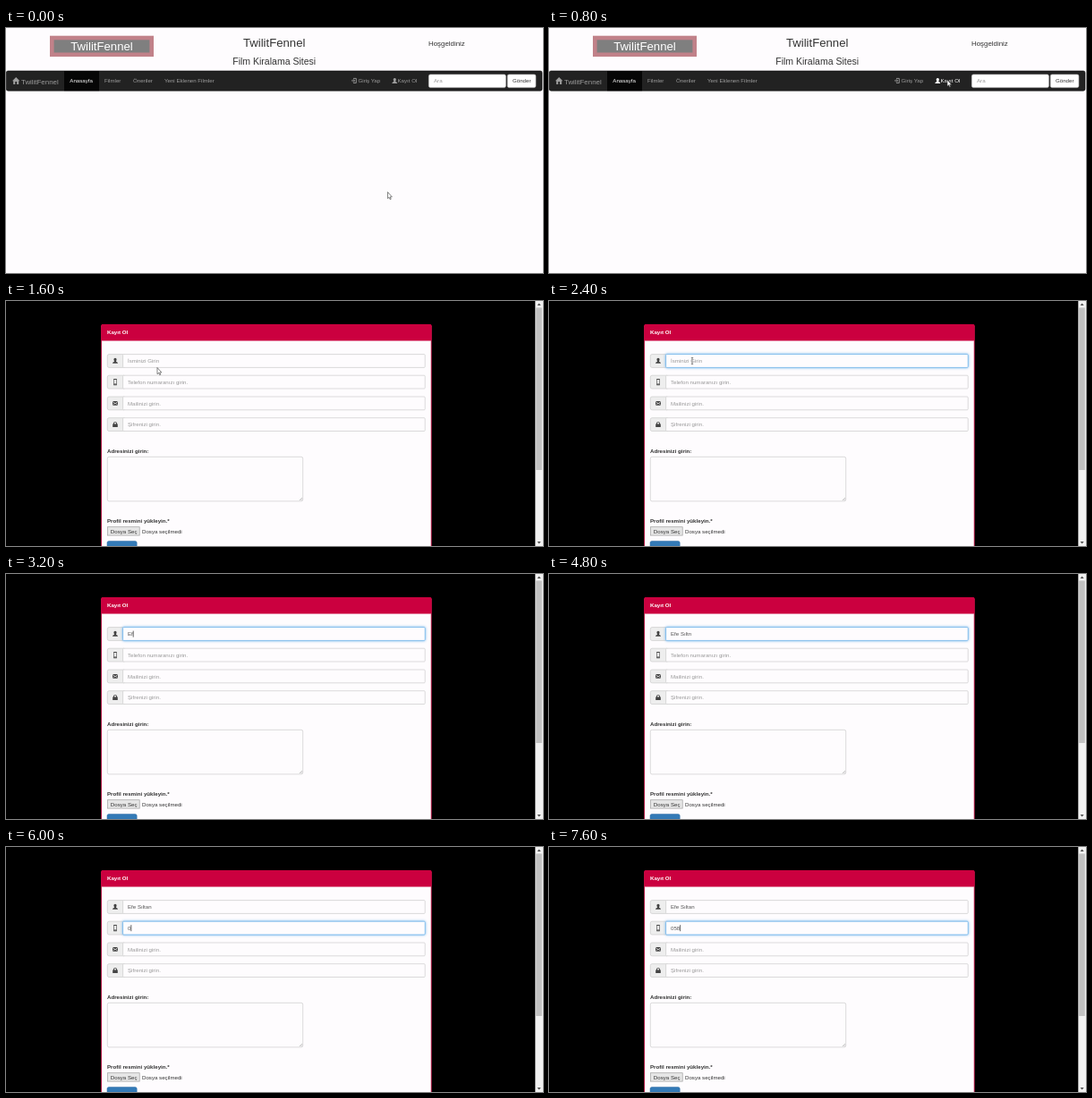
An HTML page for the animation above (8 s loop, 600 px wide and 274 px high).

```html
<!DOCTYPE html>
<html lang="tr">
<head>
<meta charset="utf-8">
<style>
html, body { margin: 0; width: 100%; height: 100%; overflow: hidden; background: #fefcfe; }
svg { display: block; }
text { font: 6.15px "Liberation Sans", Arial, sans-serif; fill: #333; white-space: pre; }
.nav { fill: #9d9d9d; }
.b { font-weight: bold; }
.h2 { font-size: 13.17px; }
.h3 { font-size: 10.53px; }
.h4 { font-size: 7.9px; }
.mid { text-anchor: middle; }
.white { fill: #fff; }
.hint { fill: #999; }
.typed { fill: #555; }
.box { fill: #fefcfe; stroke: #ccc; stroke-width: .7; }
.focus { stroke: #66afe9; filter: drop-shadow(0 0 1.6px #66afe9); }
</style>
</head>
<body>
<svg id="stage" width="600" height="274" viewBox="0 0 600 274"></svg>
<script>
const stage = document.getElementById('stage');
const text = (x, y, s, cls = '') => `<text x="${x}" y="${y}" class="${cls}">${s}</text>`;
const rect = (x, y, w, h, attrs) => `<rect x="${x}" y="${y}" width="${w}" height="${h}" ${attrs}/>`;
const icon = (x, y, d, attrs = 'fill="#444"') => `<path transform="translate(${x} ${y})" d="${d}" ${attrs}/>`;

const brand = 'TwilitFennel';
const person = 'M3 0C4.3 0 4.8 1 4.5 2.2C4.3 3 4 3.3 3.9 3.7C4.3 4.4 6 4.5 6 6H0C0 4.5 1.7 4.4 2.1 3.7C2 3.3 1.7 3 1.5 2.2C1.2 1 1.7 0 3 0Z';

const home =
  rect(51.3, 11, 111.4, 18.8, 'fill="#7f7f7f" stroke="#c18189" stroke-width="4.6"') +
  text(107, 25, brand, 'h2 mid white') +
  text(299.7, 20.5, brand, 'h2 mid') +
  text(299.7, 41, 'Film Kiralama Sitesi', 'h3 mid') +
  text(472, 19.8, 'Hoşgeldiniz', 'h4') +
  rect(.3, 48, 598.7, 22.2, 'rx="2" fill="#222" stroke="#080808" stroke-width=".6"') +
  rect(65, 48, 39, 22.2, 'fill="#060606"') +
  icon(7, 55, 'M4.2 0L8.4 4.2H7.2V8H5.1V5H3.3V8H1.2V4.2H0Z', 'fill="#9d9d9d"') +
  text(17, 62.5, brand, 'nav h4') +
  text(71.3, 61.3, 'Anasayfa', 'white') +
  text(110, 61.3, 'Filmler', 'nav') +
  text(142, 61.3, 'Öneriler', 'nav') +
  text(177, 61.3, 'Yeni Eklenen Filmler', 'nav') +
  icon(386, 56, 'M2 .4H5.3V5.4H2M0 2.9H3.4M2 1.3L3.6 2.9L2 4.5', 'fill="none" stroke="#9d9d9d" stroke-width=".9"') +
  text(393.5, 61.3, 'Giriş Yap', 'nav') +
  `<g id="join" fill="#9d9d9d">${icon(431.3, 56, person, '')}
   <text x="437.5" y="61.3" style="fill:inherit">Kayıt Ol</text></g>` +
  rect(472.4, 52, 86, 14.6, 'rx="1.8" fill="#fff" stroke="#ccc" stroke-width=".6"') +
  text(478, 61.3, 'Ara', 'hint') +
  rect(560.3, 52, 31.6, 14.6, 'rx="1.8" fill="#fff" stroke="#ccc" stroke-width=".6"') +
  text(566, 61.3, 'Gönder');

const fields = [
  { y: 59.6, hint: 'İsminizi Girin', d: person },
  { y: 83.2, hint: 'Telefon numaranızı girin.', d: 'M1.2 -.5H4.8V6.8H1.2ZM1.8 .6V5.2H4.2V.6ZM2.6 5.7V6.2H3.4V5.7Z' },
  { y: 107, hint: 'Mailinizi girin.', d: 'M0 .8H6L3 3.3ZM0 1.6L2 3.2L0 5ZM6 1.6L4 3.2L6 5ZM2.4 3.6L3 4.1L3.6 3.6L6 5.6H0Z' },
  { y: 130.7, hint: 'Şifrenizi girin.', d: 'M.2 2.7H1V2C1 -.7 5 -.7 5 2V2.7H5.8V6.2H.2ZM2 2.7H4V2C4 .5 2 .5 2 2Z' }
];

const fieldRow = ({ y, hint, d }, i) =>
  rect(113.3, y, 20, 14.8, 'rx="1.8" fill="#eee" stroke="#ccc" stroke-width=".7"') +
  icon(119, y + 4.2, d, 'fill="#444" fill-rule="evenodd"') +
  rect(130.6, y, 337.6, 14.8, `rx="1" class="box" id="box${i}"`) +
  `<text id="val${i}" x="136" y="${y + 9.6}" class="hint">${hint}</text>`;

const form =
  rect(0, 0, 600, 274, 'fill="#000"') +
  rect(591.3, 0, 8.7, 274, 'fill="#f1f1f1"') +
  rect(592.2, 7.5, 6.6, 181.5, 'fill="#c1c1c1"') +
  icon(593.6, 2.5, 'M0 2.6L2 0L4 2.6Z', 'fill="#505050"') +
  icon(593.6, 269, 'M0 0L2 2.6L4 0Z', 'fill="#505050"') +
  rect(106.6, 26.4, 368.6, 260, 'rx="1.8" fill="#fefcfe" stroke="#c9003e" stroke-width=".8"') +
  rect(106.3, 26, 369.2, 18.4, 'rx="1.5" fill="#cb003f"') +
  text(113, 37.3, 'Kayıt Ol', 'b white') +
  fields.map(fieldRow).join('') +
  text(113, 169.5, 'Adresinizi girin:', 'b') +
  rect(113.3, 174.3, 218.4, 49.6, 'rx="1.8" class="box"') +
  icon(328, 220, 'M0 3L3 0M1.7 3L3 1.7', 'stroke="#888" stroke-width=".5"') +
  text(113, 248, 'Profil resmini yükleyin.*', 'b') +
  rect(113.6, 252.7, 35.6, 9.4, 'fill="#e6e6e6" stroke="#a0a0a0" stroke-width=".7"') +
  text(116.8, 259.8, 'Dosya Seç') +
  text(152, 259.8, 'Dosya seçilmedi') +
  rect(113, 268.6, 33.2, 15, 'rx="1.8" fill="#337ab7" stroke="#2e6da4" stroke-width=".5"');

stage.innerHTML =
  `<g id="home">${home}</g><g id="form">${form}</g>
   <path id="caret" d="M0 -5.6V1.4" stroke="#222" stroke-width=".7"/>
   <path id="arrow" d="M0 0V7.2L1.6 5.8L2.7 8.2L3.7 7.8L2.7 5.4H4.8Z" fill="#fff" stroke="#333" stroke-width=".6"/>
   <path id="beam" d="M-1.2 -3.5H1.2M0 -3.5V3.5M-1.2 3.5H1.2" stroke="#444" stroke-width=".6"/>`;

const el = id => document.getElementById(id);
const show = (id, on) => el(id).setAttribute('visibility', on ? 'visible' : 'hidden');
const move = (id, x, y) => el(id).setAttribute('transform', `translate(${x} ${y})`);

// time, x, y of the pointer
const path = [
  [0, 426.5, 183.5], [200, 428, 170], [800, 445, 58], [1000, 445, 58],
  [1400, 171.7, 77.5], [1600, 169, 74.5], [2000, 160, 67], [8000, 160, 67]
];

// time, focused field, its value
const keys = [
  [2000, 0, ''], [2800, 0, 'E'], [3200, 0, 'Ef'], [3600, 0, 'Efe'], [3800, 0, 'Efe S'],
  [4000, 0, 'Efe Sı'], [4200, 0, 'Efe Sılt'], [4400, 0, 'Efe Sıltn'], [5000, 0, 'Efe Sılt'],
  [5200, 0, 'Efe Sılta'], [5400, 0, 'Efe Sıltan'], [5600, 1, ''], [6000, 1, '0'],
  [7200, 1, '05'], [7600, 1, '058']
];

function pointerAt(t) {
  const i = path.findIndex(p => p[0] > t);
  const [a, b] = [path[i - 1], path[i]];
  const k = (t - a[0]) / (b[0] - a[0]);
  return [a[1] + (b[1] - a[1]) * k, a[2] + (b[2] - a[2]) * k];
}

function draw(t) {
  const opened = t >= 1600;
  const past = keys.filter(k => k[0] <= t);
  const last = past[past.length - 1];

  show('home', !opened);
  show('form', opened);
  el('join').setAttribute('fill', t >= 800 ? '#fff' : '#9d9d9d');

  fields.forEach(({ hint }, i) => {
    const value = past.filter(k => k[1] === i).pop()?.[2];
    el('val' + i).textContent = value || hint;
    el('val' + i).setAttribute('class', value ? 'typed' : 'hint');
    el('box' + i).classList.toggle('focus', last?.[1] === i);
  });

  show('caret', last && (t - last[0]) % 1000 < 400);
  if (last) {
    const [, i, value] = last;
    const width = value ? el('val' + i).getComputedTextLength() : 0;
    move('caret', 136.4 + width, fields[i].y + 9.6);
  }

  const [x, y] = pointerAt(t);
  move('arrow', x, y);
  move('beam', x, y);
  show('arrow', t < 1800);
  show('beam', t >= 1800 && t < 2800);
}

const start = performance.now();
function tick() {
  const t = (performance.now() - start) % 8000;
  draw(Math.floor(t / 200) * 200);
  requestAnimationFrame(tick);
}
tick();
</script>
</body>
</html>
```
